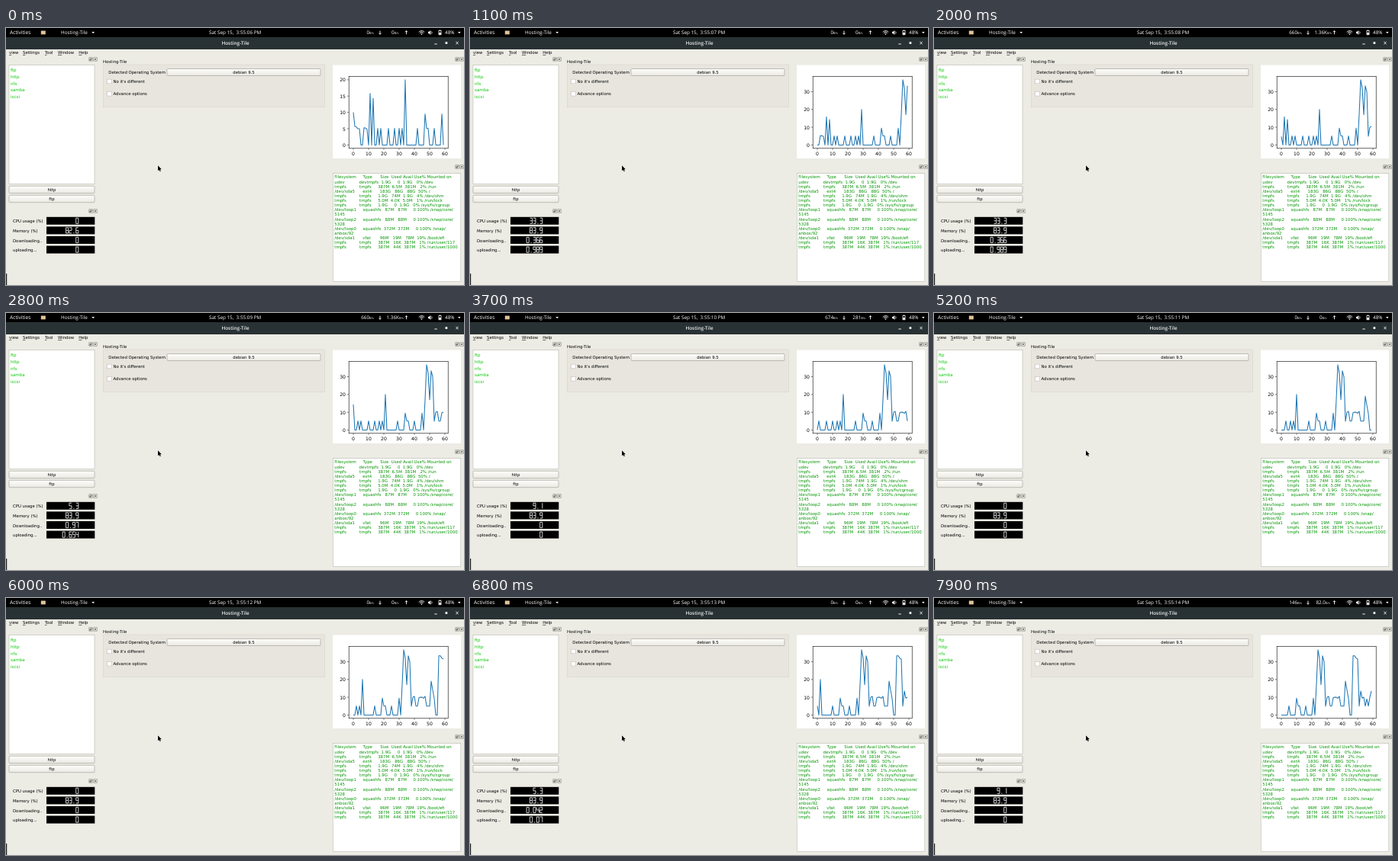
An HTML page with a canvas that plays this animation: 600 px wide and 337 px high, repeating every 8000 ms.

```html
<!DOCTYPE html>
<html>
<head>
<meta charset="utf-8">
<title>Hosting-Tile</title>
<style>
html, body { margin: 0; width: 100%; height: 100%; overflow: hidden; background: #ecebe4; }
canvas, svg { position: absolute; left: 0; top: 0; width: 600px; height: 337px; }
text { white-space: pre; text-rendering: geometricPrecision; font-family: "DejaVu Sans", sans-serif; }
.bar { font-family: "Open Sans", "Noto Sans", sans-serif; }
</style>
</head>
<body>
<canvas id="c"></canvas>
<svg id="s" viewBox="0 0 600 337"></svg>
<script>
const LOOP = 8000, APP = "Hosting-Tile";
const canvas = document.getElementById("c"), svg = document.getElementById("s");
const ctx = canvas.getContext("2d");
const ratio = window.devicePixelRatio || 1;
canvas.width = 600 * ratio;
canvas.height = 337 * ratio;

// ---- text ----
function node(tag, attrs, parent) {
  const el = document.createElementNS("http://www.w3.org/2000/svg", tag);
  for (const k in attrs) el.setAttribute(k, attrs[k]);
  parent.appendChild(el);
  return el;
}
function label(str, x, y, { size = 5.35, fill = "#000", anchor = "start", cls = "", weight = 400 } = {}) {
  const attrs = { x, y, "font-size": size, fill, "text-anchor": anchor, class: cls, "font-weight": weight };
  const el = node("text", attrs, svg);
  el.textContent = str;
  return el;
}
function setText(el, str) {
  if (el.textContent !== str) el.textContent = str;
}

const bar = { size: 6.35, fill: "#fff", cls: "bar", weight: 500 };
label("Activities", 5, 8.2, { ...bar, size: 6.7 });
label(APP, 72, 8.2, bar);
label("48%", 575, 8.2, bar);
label(APP, 300.5, 22.2, { ...bar, fill: "#eef0f0", anchor: "middle", weight: 600 });
const clock = label("", 266, 8.2, bar);
const rates = [[482, "end"], [509.7, "middle"]].map(([x, anchor]) => {
  const el = label("", x, 8.2, { ...bar, anchor });
  const value = node("tspan", {}, el);
  node("tspan", { "font-size": 4 }, el).textContent = "B/s";
  return value;
});

[["view", 4], ["Settings", 22], ["Tool", 51], ["Window", 68], ["Help", 95.3]]
  .forEach(([s, x]) => {
    const el = label("", x, 34);
    node("tspan", { "text-decoration": "underline" }, el).textContent = s[0];
    node("tspan", {}, el).textContent = s.slice(1);
  });
["ftp", "http", "nfs", "samba", "iscsi"]
  .forEach((s, i) => label(s, 6, 57.2 + i * 8.75, { size: 5.6, fill: "#0fc80f" }));
label("http", 60, 213.8, { anchor: "middle" });
label("ftp", 60, 226, { anchor: "middle" });
["CPU usage (%)", "Memory (%)", "Downloading..", "uploading..."]
  .forEach((s, i) => label(s, 9, 255 + i * 12.75));
label(APP, 127, 45.7);
label("Detected Operating System", 134.3, 60);
label("debian 9.5", 311.5, 60, { anchor: "middle" });
label("No it's different", 140.5, 71.8);
label("Advance options", 140.5, 88.2);

const disks = `Filesystem     Type      Size  Used Avail Use% Mounted on
udev           devtmpfs  1.9G     0  1.9G   0% /dev
tmpfs          tmpfs     387M  6.5M  381M   2% /run
/dev/sda5      ext4      183G   86G   88G  50% /
tmpfs          tmpfs     1.9G   74M  1.9G   4% /dev/shm
tmpfs          tmpfs     5.0M  4.0K  5.0M   1% /run/lock
tmpfs          tmpfs     1.9G     0  1.9G   0% /sys/fs/cgroup
/dev/loop1     squashfs   87M   87M     0 100% /snap/core/
5145
/dev/loop2     squashfs   88M   88M     0 100% /snap/core/
5328
/dev/loop0     squashfs  372M  372M     0 100% /snap/
anbox/92
/dev/sda1      vfat       96M   19M   78M  19% /boot/efi
tmpfs          tmpfs     387M   16K  387M   1% /run/user/117
tmpfs          tmpfs     387M   44K  387M   1% /run/user/1000`;
disks.split("\n").forEach((s, i) => label(s, 430.3, 197.4 + i * 6.13, { size: 5.42, fill: "#069606" }));

const tick = { size: 6.1 };
for (let i = 0; i <= 6; i++) label(String(i * 10), 455 + i * 20, 166.6, { ...tick, anchor: "middle" });
const yLabels = [0, 1, 2, 3, 4].map(() => label("", 445, 0, { ...tick, anchor: "end" }));

// ---- data ----
const load = new Array(60).fill(0);
[10, 5.7, 5.5, 5, 5, 0, 0, 5.3, 5.2, 4.8, 0, 15.8, 0, 14.3].forEach((v, i) => load[i] = v);
[16, 18, 23, 27, 30, 32, 42, 48, 49, 53].forEach(i => load[i] = 5.1);
load[34] = 20;
load[47] = load[58] = 9.5;
load.push(17, 36.7, 32, 17, 33.3, 30, 4.9, 10, 10.5, 5, 5, 9.7, 10, 10, 9.4, 10.5, 5, 5, 5,
  19, 14, 9.3, 0, 0, 33.3, 33.3, 32, 31.5, 5, 13.5, 9.5, 10, 5, 9, 5, 10, 13.5);

const gauges = [
  [0, "0", "82.6", "0", "0"],
  [100, "0", "82.9", "0", "0"],
  [1100, "33.3", "83.9", "0.366", "0.989"],
  [2200, "5.3", "83.9", "0.97", "0.654"],
  [3200, "9.1", "83.9", "0", "0"],
  [4200, "5", "83.9", "0", "0"],
  [5200, "0", "83.9", "0", "0"],
  [6200, "5.3", "83.9", "0.042", "0.07"],
  [7200, "9.1", "83.9", "0", "0"]
];
const traffic = [
  [0, "0", "0"], [1900, "660", "1.36K"], [2900, "674", "281"], [3900, "0", "0"], [7900, "146", "82.0"]
];
const at = (rows, t) => rows.filter(r => r[0] <= t).pop();

// Samples arrive every 200 ms, now and then 100 ms late.
const late = [8, 15, 27, 35];
const arrival = n => 100 + 200 * n + 100 * late.filter(k => n >= k).length;
function shiftAt(t) {
  let n = 0;
  while (arrival(n + 1) <= t) n++;
  return n;
}

// ---- shapes ----
function rect(x, y, w, h, fill) {
  ctx.fillStyle = fill;
  ctx.fillRect(x, y, w, h);
}
function frame(x, y, w, h, stroke, width = 0.6) {
  ctx.strokeStyle = stroke;
  ctx.lineWidth = width;
  ctx.strokeRect(x, y, w, h);
}
function line(points, stroke, width) {
  ctx.strokeStyle = stroke;
  ctx.lineWidth = width;
  ctx.beginPath();
  points.forEach(([x, y]) => ctx.lineTo(x, y));
  ctx.stroke();
}
function poly(points, fill) {
  ctx.fillStyle = fill;
  ctx.beginPath();
  points.forEach(([x, y]) => ctx.lineTo(x, y));
  ctx.fill();
}
function button(x, y, w, h) {
  const g = ctx.createLinearGradient(0, y, 0, y + h);
  g.addColorStop(0, "#fdfdfb");
  g.addColorStop(1, "#ebe9e3");
  ctx.fillStyle = g;
  ctx.strokeStyle = "#aaa79f";
  ctx.lineWidth = 0.7;
  ctx.beginPath();
  ctx.roundRect(x, y, w, h, 1);
  ctx.fill();
  ctx.stroke();
}
function dockIcons(x, y) {
  const c = "#55534e";
  for (const left of [x - 2.2, x + 3.8]) frame(left, y - 2.2, 4.4, 4.4, "#85837c");
  frame(x - 1.2, y - 0.2, 1.5, 1.4, c);
  line([[x - 0.4, y - 1.2], [x + 1.2, y - 1.2], [x + 1.2, y + 0.4]], c, 0.6);
  line([[x + 4.8, y - 1.2], [x + 7.2, y + 1.2]], c, 0.7);
  line([[x + 7.2, y - 1.2], [x + 4.8, y + 1.2]], c, 0.7);
}
function arrow(x, y, dir) {
  const c = "#fff";
  line([[x, y - 2.3], [x, y + 2.3]], c, 0.9);
  line([[x - 1.6, y + dir * 0.7], [x, y + dir * 2.3], [x + 1.6, y + dir * 0.7]], c, 0.9);
}

function topBar() {
  const c = "#f0f0f0";
  rect(0, 0, 600, 12, "#000");
  rect(0, 12, 600, 16, "#283134");
  rect(45.8, 3.6, 6, 4.8, "#e2c498");
  poly([[112.3, 5], [116, 5], [114.15, 7.3]], c);
  poly([[592, 5], [595.6, 5], [593.8, 7.3]], c);
  arrow(490, 6, 1);
  arrow(524.5, 6, -1);
  for (const r of [1.6, 3.3, 5]) {
    ctx.strokeStyle = c;
    ctx.lineWidth = 0.9;
    ctx.beginPath();
    ctx.arc(544.5, 8.6, r, -Math.PI * 0.77, -Math.PI * 0.23);
    ctx.stroke();
  }
  rect(544, 7.9, 1, 1, c);
  poly([[553, 4.8], [554.5, 4.8], [556.3, 3], [556.3, 9], [554.5, 7.2], [553, 7.2]], c);
  line([[557.4, 4.4], [558.2, 6], [557.4, 7.6]], c, 0.8);
  frame(567, 3.6, 3, 5.2, c, 0.8);
  rect(567.6, 2.6, 1.8, 1, c);
  rect(567, 6, 3, 2.8, c);
  line([[561.3, 21], [564.8, 21]], c, 1);
  rect(575.5, 18.2, 2.8, 2.8, c);
  line([[589.4, 18], [592.6, 21.2]], c, 1);
  line([[592.6, 18], [589.4, 21.2]], c, 1);
}

function panels() {
  rect(0, 28, 600, 309, "#ecebe4");
  [[111, 41], [591, 41], [111, 240], [591, 182]].forEach(p => dockIcons(...p));
  rect(4, 48.5, 112, 156, "#fff");
  frame(4, 48.5, 112, 156, "#b9b7b0");
  button(4, 207.2, 112, 9.4);
  button(4, 219.3, 112, 9.4);
  rect(127.3, 48, 290.3, 55.8, "#e7e5de");
  frame(127.3, 48, 290.3, 55.8, "#d6d4cd");
  button(211, 53.5, 201, 9);
  for (const y of [67.2, 83.5]) {
    rect(132.6, y, 5.6, 5.6, "#fff");
    frame(132.6, y, 5.6, 5.6, "#c2c0b9");
  }
  rect(428, 48.5, 168, 122.5, "#fff");
  rect(428, 190.5, 168, 142, "#fff");
  frame(428.3, 190.5, 167.5, 142, "#b9b7b0");
  rect(0, 322, 1.2, 15, "#222");
}

// Segments in order: top, upper right, lower right, bottom, lower left, upper left, middle
const SEGS = [[0, 0, 1, 0], [1, 0, 1, 1], [1, 1, 1, 2], [0, 2, 1, 2], [0, 1, 0, 2], [0, 0, 0, 1], [0, 1, 1, 1]];
const LIT = ["012345", "12", "01346", "01236", "1256", "02356", "023456", "012", "0123456", "012356"];
function lcd(str, y) {
  rect(53, y, 63.3, 10, "#000");
  [...str].forEach((ch, i) => {
    const x = 91.7 - (str.length - 1 - i) * 4.4, top = y + 1.4;
    if (ch === ".") return rect(x + 1.1, top + 6.5, 1, 1, "#f2f2f2");
    for (const s of LIT[ch]) {
      const [a, b, c, d] = SEGS[s];
      line([[x + a * 3.1, top + b * 3.6], [x + c * 3.1, top + d * 3.6]], "#f0f0f0", 0.85);
    }
  });
}

function plot(n) {
  const data = load.slice(n, n + 60);
  const max = Math.max(...data), step = max > 25 ? 10 : 5;
  const yOf = v => 153.4 - v * 85.5 / max;
  for (let i = 0; i <= 6; i++) line([[455 + i * 20, 157.7], [455 + i * 20, 159.8]], "#000", 0.5);
  yLabels.forEach((el, i) => {
    const v = i * step, y = yOf(v), on = v <= max;
    if (on) line([[447, y], [449.1, y]], "#000", 0.5);
    setText(el, on ? String(v) : "");
    el.setAttribute("y", y + 2.5);
  });
  ctx.lineJoin = "round";
  line(data.map((v, i) => [455 + i * 2, yOf(v)]), "#1f77b4", 1.05);
  ctx.lineJoin = "miter";
  frame(449.2, 63.6, 130, 94.2, "#000", 0.6);
}

function pointer() {
  const p = [[199, 180.2], [199, 187.2], [200.6, 185.9], [201.7, 188.2], [202.8, 187.7], [201.8, 185.4], [203.9, 185.2], [199, 180.2]];
  line(p, "#fff", 0.9);
  poly(p, "#000");
}

function draw(now) {
  const t = now % LOOP;
  ctx.setTransform(ratio, 0, 0, ratio, 0, 0);
  topBar();
  panels();
  plot(shiftAt(t));
  at(gauges, t).slice(1).forEach((s, i) => lcd(s, 247.8 + i * 12.6));
  pointer();
  const sec = 7 + Math.floor((t - 300) / 1000);
  setText(clock, "Sat Sep 15,  3:55:" + String(sec).padStart(2, "0") + " PM");
  at(traffic, t).slice(1).forEach((s, i) => setText(rates[i], s));
}

let start;
function loop(now) {
  if (start === undefined) start = now;
  draw(Math.max(0, now - start));
  requestAnimationFrame(loop);
}
draw(0);
requestAnimationFrame(loop);
</script>
</body>
</html>
```
